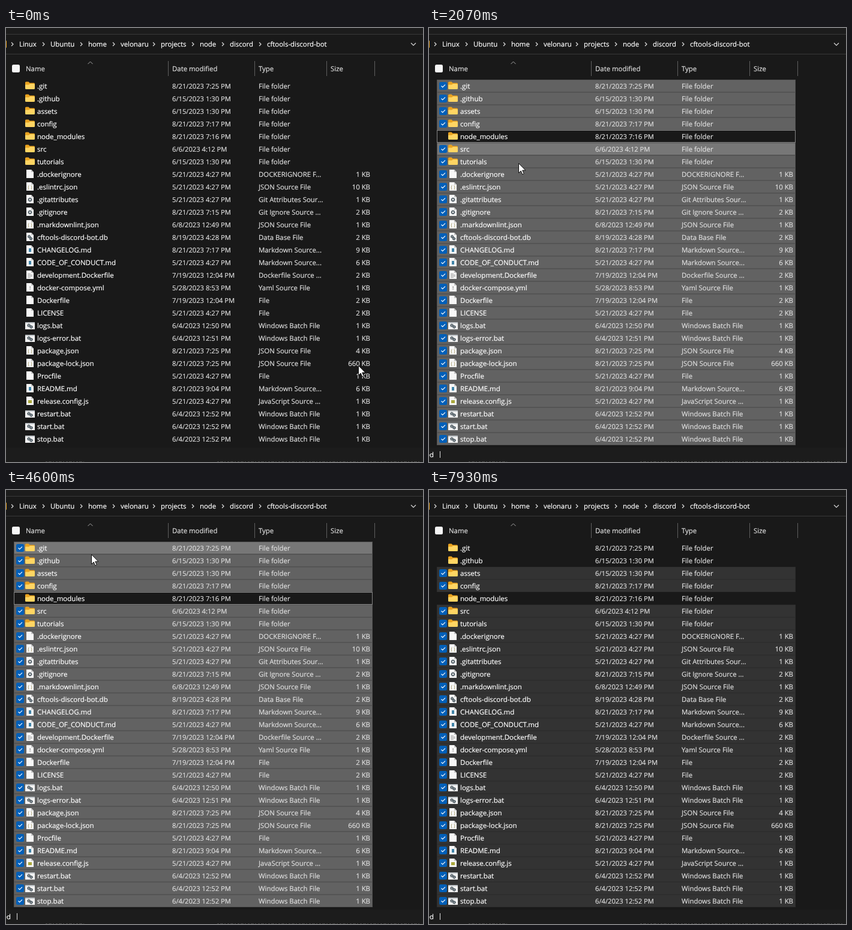
Write an HTML page that moves like this. It is 695 px wide and 723 px high and loops after 8000 ms.

```html
<!DOCTYPE html>
<html lang="en">
<head>
<meta charset="utf-8">
<title>File list</title>
<style>
html, body { margin: 0; width: 100%; height: 100%; overflow: hidden; background: #191919; }
svg { display: block; width: 695px; height: 723px; }
text { font: 11.4px "Open Sans", "Noto Sans", sans-serif; fill: #fff; stroke: #fff; stroke-width: 0.2px; text-rendering: geometricPrecision; white-space: pre; }
.name { font-size: 11.5px; }
.dim { fill: #dedede; stroke: #dedede; }
.date { font-size: 11.2px; }
.end { text-anchor: end; }
.mark { font-size: 8px; text-anchor: middle; stroke: none; }
</style>
</head>
<body>
<svg id="stage" viewBox="0 0 695 723"></svg>
<script>
const FPS = 15, LOOP = 8000, TOP = 86, PITCH = 21;
const BLUE = '#005fb8';
const stage = document.getElementById('stage');

const TYPES = {
  folder: 'File folder', file: 'File', json: 'JSON Source File', md: 'Markdown Source...',
  bat: 'Windows Batch File', ignore: 'DOCKERIGNORE F...', attr: 'Git Attributes Sour...',
  git: 'Git Ignore Source ...', db: 'Data Base File', docker: 'Dockerfile Source ...',
  yml: 'Yaml Source File', js: 'JavaScript Source ...'
};

// name | date | kind | size in KB
const FILES = `.git|8/21/2023 7:25 PM|folder
.github|6/15/2023 1:30 PM|folder
assets|6/15/2023 1:30 PM|folder
config|8/21/2023 7:17 PM|folder
node_modules|8/21/2023 7:16 PM|folder
src|6/6/2023 4:12 PM|folder
tutorials|6/15/2023 1:30 PM|folder
.dockerignore|5/21/2023 4:27 PM|ignore|1
.eslintrc.json|5/21/2023 4:27 PM|json|10
.gitattributes|5/21/2023 4:27 PM|attr|1
.gitignore|8/21/2023 7:15 PM|git|2
.markdownlint.json|6/8/2023 12:49 PM|json|1
cftools-discord-bot.db|8/19/2023 4:28 PM|db|2
CHANGELOG.md|8/21/2023 7:17 PM|md|9
CODE_OF_CONDUCT.md|5/21/2023 4:27 PM|md|6
development.Dockerfile|7/19/2023 12:04 PM|docker|2
docker-compose.yml|5/28/2023 8:53 PM|yml|1
Dockerfile|7/19/2023 12:04 PM|file|2
LICENSE|5/21/2023 4:27 PM|file|2
logs.bat|6/4/2023 12:50 PM|bat|1
logs-error.bat|6/4/2023 12:51 PM|bat|1
package.json|8/21/2023 7:25 PM|json|4
package-lock.json|8/21/2023 7:25 PM|json|660
Procfile|5/21/2023 4:27 PM|file|1
README.md|8/21/2023 9:04 PM|md|6
release.config.js|5/21/2023 4:27 PM|js|1
restart.bat|6/4/2023 12:52 PM|bat|1
start.bat|6/4/2023 12:52 PM|bat|1
stop.bat|6/4/2023 12:52 PM|bat|1`.split('\n').map(line => line.split('|'));

function add(tag, attrs, parent = stage, content = '') {
  const el = document.createElementNS('http://www.w3.org/2000/svg', tag);
  for (const key in attrs) el.setAttribute(key, attrs[key]);
  el.textContent = content;
  parent.append(el);
  return el;
}
const label = (x, y, content, cls = '', parent = stage) => add('text', { x, y, class: cls }, parent, content);
const box = (x, y, width, height, fill, parent = stage, rx = 0) => add('rect', { x, y, width, height, fill, rx }, parent);
const line = (d, stroke, parent = stage, width = 1) => add('path', { d, stroke, fill: 'none', 'stroke-width': width }, parent);
const show = (el, visible) => el.setAttribute('visibility', visible ? 'visible' : 'hidden');

function gear(x, y, r, parent) {
  add('circle', { cx: x, cy: y, r, fill: 'none', stroke: '#46545c', 'stroke-width': 1.5 }, parent);
  add('circle', { cx: x, cy: y, r: r + 1, fill: 'none', stroke: '#46545c', 'stroke-width': 1, 'stroke-dasharray': '1.2 1.6' }, parent);
}

// Icons are drawn relative to the top border of their row.
function icon(kind, g) {
  if (kind === 'folder') {
    add('path', { d: 'M32 5q0-1.500 1.500-1.500h4l2 2h7q1.500 0 1.500 1.500v5h-16z', fill: '#e9a21f' }, g);
    add('path', { d: 'M32 8.500h6l2-1.500h6.500q1.500 0 1.500 1.500v6q0 1.500-1.500 1.500h-13q-1.500 0-1.500-1.500z', fill: '#ffd563' }, g);
    return;
  }
  if (kind === 'bat') {
    box(32, 5, 16, 12, '#f2f2f2', g);
    box(32, 5, 16, 2, '#bfc4c8', g);
    gear(38, 10.5, 1.6, g);
    gear(42, 13, 1.6, g);
    return;
  }
  add('path', { d: 'M34 3h8l4 4v10h-12z', fill: '#f7f7f7' }, g);
  add('path', { d: 'M42 3v4h4z', fill: '#c4c4c4' }, g);
  const mark = (content, fill) => label(40, 14, content, 'mark', g).style.fill = fill;
  if (kind === 'json') mark('{ }', '#9a8f55');
  if (kind === 'yml') mark('!', '#333');
  if (kind === 'attr' || kind === 'git') gear(40, 11, 2.2, g);
  if (kind === 'db') { gear(38.5, 9.5, 1.5, g); gear(41.5, 13, 1.5, g); }
  if (kind === 'docker') line('M36 8.500h5M36 10.500h8M36 12.500h8M36 14.500h5', '#a5a5a5', g);
  if (kind === 'md') box(38, 8, 4, 6, '#3f83a8', g);
  if (kind === 'js') box(37, 9, 6, 5, '#aaa83c', g);
}

function checkbox(x, y, parent) {
  const g = add('g', { transform: `translate(${x} ${y})` }, parent);
  const fill = box(0, 0, 13, 13, '#f5f5f5', g, 2.5);
  const tick = line('M3.500 6.500l2.200 2.200 4.300-4.400', '#fff', g, 1.1);
  return (visible, checked) => {
    show(fill, visible);
    show(tick, visible && checked);
    fill.setAttribute('fill', checked ? BLUE : '#f5f5f5');
  };
}

function drawChrome() {
  box(0, 0, 695, 723, '#191919');
  box(0, 0, 695, 10, '#1c1c1c');
  box(0, 699, 695, 24, '#1c1c1c');
  line('M0 10.500H695M0 43.500H695', '#393939');
  box(-4, 21, 5, 12, '#e9a21f', stage, 1);
  const crumbs = { Linux: 22, Ubuntu: 74, home: 137, velonaru: 191, projects: 258, node: 323, discord: 373, 'cftools-discord-bot': 435 };
  for (const name in crumbs) {
    label(crumbs[name], 31, name);
    line(`M${crumbs[name] - 13} 24l3 3-3 3`, '#e0e0e0', stage, 1.2);
  }
  line('M675 25l4 4 4-4', '#e0e0e0', stage, 1.1);
  line('M136.500 60l4-4 4 4', '#a5a5a5');
  const heads = { Name: 33, 'Date modified': 277, Type: 421, Size: 541 };
  for (const name in heads) label(heads[name], 72, name, 'dim');
  line('M270.500 55V80M414.500 55V80M534.500 55V80M614.500 55V80', '#5f5f5f');
  add('path', { d: 'M66 722.500H130M352 722.500H692', stroke: '#484848', 'stroke-dasharray': '3 2 5 2 2 3' });
}

function makeRow([name, date, kind, size], i) {
  const g = add('g', { transform: `translate(0 ${TOP + i * PITCH})` });
  const back = add('rect', { x: 13.5, y: 0.5, width: 597, height: PITCH - 1 }, g);
  const check = checkbox(17, 4, g);
  icon(kind, g);
  label(52, 15, name, 'name', g);
  label(277, 15, date, 'dim date', g);
  label(421, 15, TYPES[kind], 'dim', g);
  if (size) label(607, 15, size + ' KB', 'dim end', g);
  return { back, check };
}

drawChrome();
const headCheck = checkbox(10, 61, stage);
const rows = FILES.map(makeRow);
const sizeNote = label(3, 715, '8.38 KB');
const countNote = label(8, 715, '29 items selected', 'end');
const noteBar = line('M0.500 705V716', '#e0e0e0');
const cursor = add('path', {
  d: 'M.5.500V16.500L4.200 13 6.700 18.800 9.200 17.700 6.700 12.100H11.800Z',
  fill: '#fff', stroke: '#000', 'stroke-width': 0.9
});

// Pointer path: step, x, y
const PATH = [
  [0, 587, 562], [5, 470, 385], [6, 459, 371], [7, 457, 372], [9, 455, 431], [12, 455, 433],
  [15, 455, 433], [24, 143, 181], [28, 143, 181], [29, 143, 183], [30, 144, 200], [31, 149, 225],
  [32, 152, 236], [34, 152, 236], [40, 165, 346], [42, 165, 346], [45, 176, 185], [46, 173, 169],
  [47, 168, 145], [48, 167, 138], [50, 167, 138], [58, 155, 351], [60, 155, 351], [68, 142, 106],
  [69, 142, 107], [71, 141, 99], [76, 141, 97], [78, 142, 118], [80, 142, 118], [83, 160, 297],
  [86, 160, 297], [89, 219, 468], [90, 221, 472], [92, 225, 470], [98, 193, 411], [101, 193, 411],
  [103, 305, 498], [105, 305, 498], [108, 652, 454]
];
const PICK = 6, ALL = 14, DROP_MODULES = 29, DROP_GIT = 75, DROP_GITHUB = 79, BLUR = 94, LEAVE = 109;

function pointer(step) {
  const n = PATH.findIndex(p => p[0] >= step);
  if (n < 0) return PATH[PATH.length - 1].slice(1);
  if (n === 0) return PATH[0].slice(1);
  const [a, b] = [PATH[n - 1], PATH[n]];
  const u = (step - a[0]) / (b[0] - a[0]);
  return [1, 2].map(c => Math.round(a[c] + (b[c] - a[c]) * u));
}

function isSelected(i, step) {
  if (step < PICK) return false;
  if (step < ALL) return i === 13;
  return !(i === 4 && step >= DROP_MODULES || i === 0 && step >= DROP_GIT || i === 1 && step >= DROP_GITHUB);
}

function focusedRow(step) {
  if (step < PICK || step >= BLUR) return -1;
  return step < DROP_MODULES ? 13 : step < DROP_GIT ? 4 : step < DROP_GITHUB ? 0 : 1;
}

// The hover highlight trails the pointer by one step.
function hoveredRow(step) {
  if (step < 1 || step >= BLUR) return -1;
  return Math.floor((pointer(step - 1)[1] - TOP) / PITCH);
}

// Fill and border of a row.
function rowPaint(selected, hovered, focused, active) {
  if (selected && !active) return ['#333333', '#2e2e2e'];
  if (selected) return [hovered || focused ? '#777777' : '#626262', '#545454'];
  if (hovered) return ['#4d4d4d', '#484848'];
  return ['none', focused ? '#858585' : 'none'];
}

function draw(ms) {
  const step = Math.floor((ms % LOOP) * FPS / 1000 + 0.06);
  const hover = hoveredRow(step), focus = focusedRow(step);
  rows.forEach(({ back, check }, i) => {
    const selected = isSelected(i, step), hovered = i === hover;
    const [fill, stroke] = rowPaint(selected, hovered, i === focus, step < BLUR);
    back.setAttribute('fill', fill);
    back.setAttribute('stroke', stroke);
    check(selected || hovered, selected);
  });
  headCheck(true, step >= ALL && step < DROP_MODULES);
  show(sizeNote, step >= PICK && step < ALL);
  show(countNote, step >= ALL);
  show(noteBar, step >= PICK);
  noteBar.setAttribute('transform', `translate(${step < ALL ? 51 : 18} 0)`);
  cursor.setAttribute('transform', `translate(${pointer(step).join(' ')})`);
  show(cursor, step < LEAVE);
}

const start = performance.now();
function tick() {
  draw(performance.now() - start);
  requestAnimationFrame(tick);
}
tick();
</script>
</body>
</html>
```
